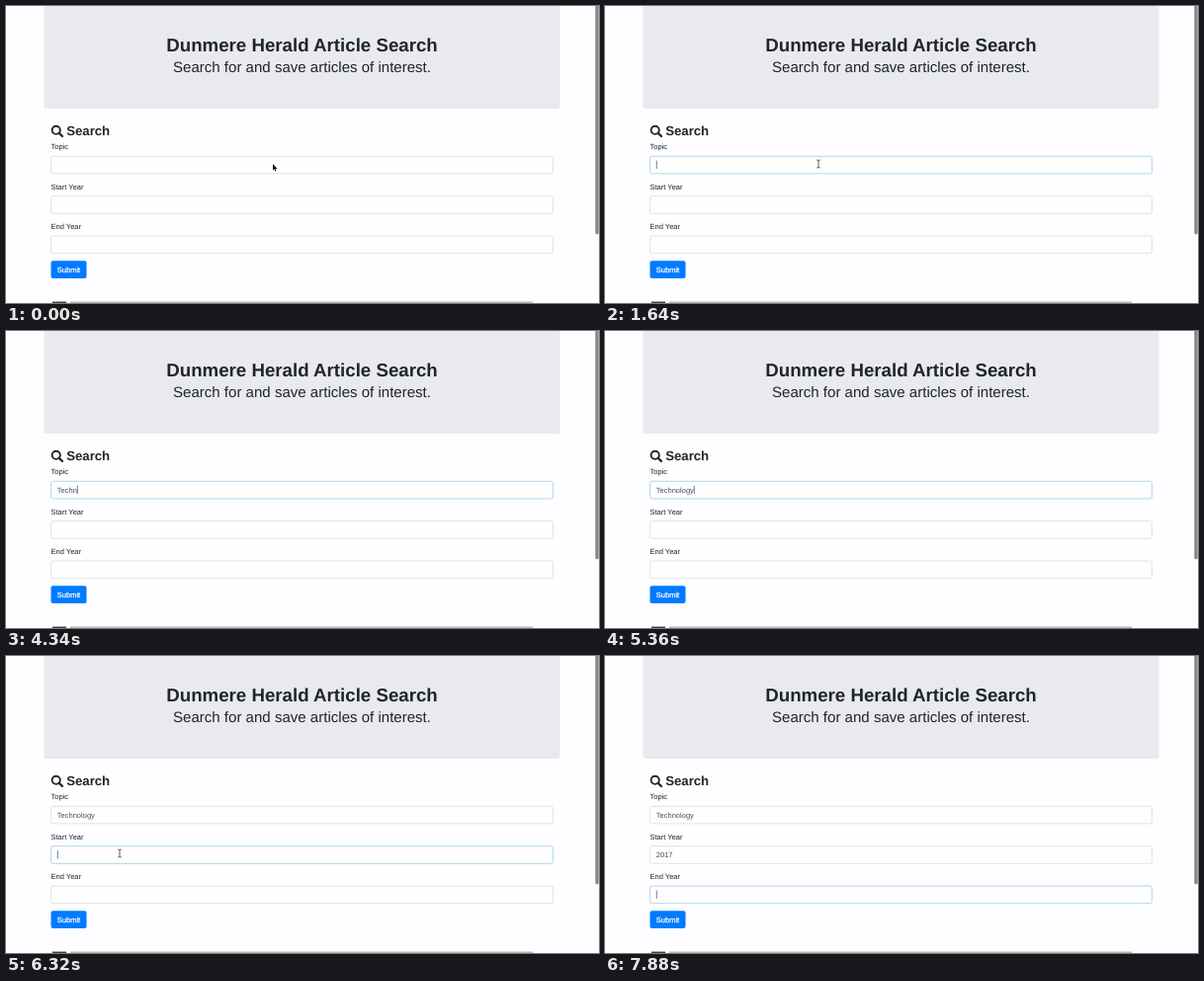
Recreate the animation shown at these times as an HTML page. Size 600 px wide and 301 px high, loop 8 s.

```html
<!DOCTYPE html>
<html lang="en">
<head>
<meta charset="utf-8">
<title>Article Search</title>
<style>
  html, body { margin: 0; width: 100%; height: 100%; overflow: hidden; background: #fefdff; }
  svg { display: block; width: 600px; height: 301px; }
  text { font: 7.52px "Liberation Sans", Arial, sans-serif; fill: #212529; text-rendering: geometricPrecision; }
  .title { font-size: 18.7px; font-weight: bold; text-anchor: middle; }
  .lead { font-size: 15.05px; text-anchor: middle; }
  .heading { font-size: 13.2px; font-weight: bold; }
  .value { fill: #495057; }
  .button { fill: #fff; stroke: #fff; stroke-width: .25; }
</style>
</head>
<body>
<svg id="stage" viewBox="0 0 600 301">
  <defs>
    <linearGradient id="shade" x1="0" y1="0" x2="0" y2="1">
      <stop offset="0" stop-color="#999" stop-opacity="0"/>
      <stop offset="1" stop-color="#888" stop-opacity=".75"/>
    </linearGradient>
  </defs>
  <rect width="600" height="301" fill="#fefdff"/>
  <rect x="38.5" y="-6" width="522" height="110" rx="2.8" fill="#e8eaee"/>
  <text class="title" x="299.5" y="46">Dunmere Herald Article Search</text>
  <text class="lead" x="299.5" y="67.3">Search for and save articles of interest.</text>

  <g fill="none" stroke="#212529">
    <circle cx="50.7" cy="125.8" r="4.1" stroke-width="1.9"/>
    <path d="M53.8 128.9 L57 132" stroke-width="2.3" stroke-linecap="round"/>
  </g>
  <text class="heading" x="61.2" y="131">Search</text>

  <g id="form"></g>
  <rect x="45.5" y="258.2" width="36" height="17.8" rx="2" fill="#007bff"/>
  <text class="button" x="51.8" y="269.8">Submit</text>

  <rect x="47" y="299.6" width="14" height="1.4" fill="#3a3d42"/>
  <rect x="65" y="298.4" width="468" height="2.6" fill="url(#shade)"/>
  <rect x="596.3" y="-4" width="3.4" height="235.5" rx="1.7" fill="#858587"/>

  <rect id="caret" width=".8" height="8.4" fill="#555b61"/>
  <circle id="halo" r="10" fill="#777" fill-opacity=".1" stroke="#777" stroke-opacity=".25"/>
  <path id="arrow" d="M0 0 V6.6 L1.5 5.3 L2.5 7.5 L3.5 7.1 L2.5 4.9 H4.5 Z" fill="#111" stroke="#fff" stroke-width=".5" paint-order="stroke"/>
  <path id="beam" d="M-1.8 -4 Q0 -4 0 -3 Q0 -4 1.8 -4 M0 -3 V3 M-1.8 4 Q0 4 0 3 Q0 4 1.8 4" fill="none" stroke="#444" stroke-width=".85"/>
</svg>
<script>
const LOOP = 8000, STEP = 60, LEFT = 51.8;
const NS = "http://www.w3.org/2000/svg";
const byId = id => document.getElementById(id);
const [form, caret, halo, arrow, beam] = ["form", "caret", "halo", "arrow", "beam"].map(byId);

function add(tag, attrs, content = "") {
  const node = document.createElementNS(NS, tag);
  for (const key in attrs) node.setAttribute(key, attrs[key]);
  node.textContent = content;
  return form.appendChild(node);
}

// focus: when the field gains and loses focus; keys: when each letter arrives
const fields = [
  { label: "Topic", text: "Technology", focus: [1580, 6260],
    keys: [2900, 3020, 3200, 3260, 4340, 4400, 4520, 4640, 5000, 5060] },
  { label: "Start Year", text: "2017", focus: [6260, 7280], keys: [6920, 6980, 7040, 7100] },
  { label: "End Year", text: "", focus: [7280, LOOP], keys: [] }
];
fields.forEach((field, i) => {
  field.y = 152.3 + i * 40.4;
  add("text", { x: 45.5, y: field.y - 7.2 }, field.label);
  field.box = add("rect", { x: 45.6, y: field.y, width: 507.8, height: 17.6, rx: 1.9, fill: "#fffeff", "stroke-width": .9 });
  field.value = add("text", { class: "value", x: LEFT, y: field.y + 11.2 });
});

const caretOn = [
  [1640, 1880], [2180, 2480], [2780, 3560], [3860, 4160], [4340, 4940], [5360, 5660],
  [5960, 6260], [6320, 6560], [6860, 7280], [7340, 7580], [7880, LOOP]
];
const returnPath = [[170, 176], [140, 203], [124, 213], [117, 205], [115, 200]];

const within = (t, [from, to]) => t >= from && t < to;
const show = (node, on) => node.setAttribute("visibility", on ? "visible" : "hidden");
const place = (node, [x, y]) => node.setAttribute("transform", `translate(${x} ${y})`);
const stepsSince = (t, start) => Math.floor((t - start) / STEP);

function pointer(t) {
  if (t < 980) {
    const k = Math.min(4, Math.max(0, stepsSince(t, 500) + 1)) / 4;
    return [270 - 55 * (1 - (1 - k) ** 2), 160];
  }
  if (t < 5840) return [216, 160];
  return returnPath[Math.min(4, stepsSince(t, 5840))];
}

function borderColor(t, [from, to]) {
  if (!within(t, [from, to])) return "#dedee4";
  return t < from + STEP ? "#c6d9e6" : "#a6d3e8";
}

function render(t) {
  for (const field of fields) {
    field.box.setAttribute("stroke", borderColor(t, field.focus));
    field.value.textContent = field.text.slice(0, field.keys.filter(at => t >= at).length);
  }

  const active = fields.find(field => within(t, field.focus));
  show(caret, active && caretOn.some(span => within(t, span)));
  if (active) {
    const length = active.value.textContent ? active.value.getComputedTextLength() : 0;
    place(caret, [LEFT + length, active.y + 4.4]);
  }

  const at = pointer(t);
  const visible = t < 2900 || within(t, [5840, 6920]);
  const isArrow = t < 980 || within(t, [5900, 6020]) && at[1] > 211;
  [arrow, beam, halo].forEach(node => place(node, at));
  show(arrow, visible && isArrow);
  show(beam, visible && !isArrow);
  show(halo, within(t, [980, 1040]) || within(t, [6260, 6320]));
}

function tick() {
  render(performance.now() % LOOP);
  requestAnimationFrame(tick);
}
tick();
</script>
</body>
</html>
```
